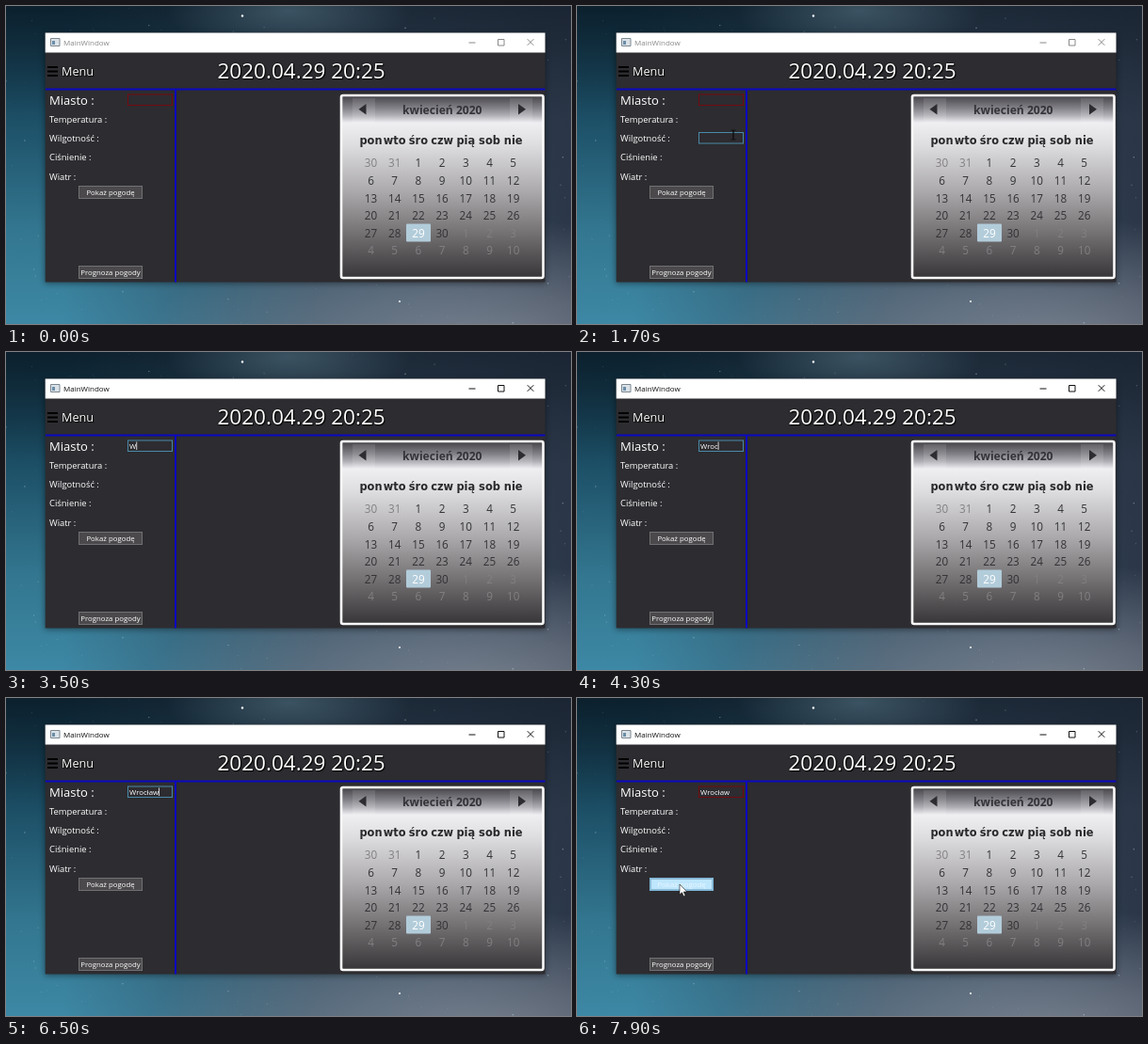
An HTML page for the animation above (8000 ms loop, 600 by 338 pixels).

```html
<!DOCTYPE html>
<html lang="pl">
<head>
<meta charset="utf-8">
<title>MainWindow</title>
<style>
  html, body { margin: 0; width: 100%; height: 100%; overflow: hidden; background: #173545; }
  svg { display: block; width: 600px; height: 338px; font-family: "Open Sans", "Noto Sans", sans-serif; }
  .label { font-size: 9.4px; font-weight: 500; fill: #fff; }
  .glow { fill: #fff; font-weight: 500; text-shadow: 1px 1px 1px #000, 0 0 2px #000; }
  .small { font-size: 7.8px; font-weight: 500; fill: #fff; }
  .mid { text-anchor: middle; }
  .head { font: bold 11.4px "DejaVu Sans", sans-serif; fill: #29292c; }
  .day { font-size: 11.7px; fill: #333235; }
  .other { fill: #828082; }
  .button rect { fill: #4b494b; stroke: #717073; }
  .button .focus { display: none; fill: none; stroke: #3b6a88; stroke-width: .7; stroke-dasharray: 1 1; }
  .button.hover rect { fill: #bee6fd; stroke: #7fb9dc; }
  .button.hover text { fill: #e9f6ff; }
  .button.hover .focus { display: block; }
  .box { fill: none; stroke: none; }
  .box.invalid { stroke: #730a10; }
  .box.lit { stroke: #4a8aa8; }
</style>
</head>
<body>
<svg viewBox="0 0 600 338">
  <defs>
    <linearGradient id="sky" x2="0" y2="1">
      <stop offset="0" stop-color="#0f2b3a"/>
      <stop offset=".35" stop-color="#1c4f66"/>
      <stop offset=".7" stop-color="#33768f"/>
      <stop offset="1" stop-color="#3d88a5"/>
    </linearGradient>
    <linearGradient id="dusk">
      <stop offset=".1" stop-color="#364354" stop-opacity="0"/>
      <stop offset=".55" stop-color="#364354" stop-opacity=".75"/>
      <stop offset="1" stop-color="#2b3445" stop-opacity=".95"/>
    </linearGradient>
    <radialGradient id="haze" gradientUnits="userSpaceOnUse" cx="0" cy="0" r="1"
      gradientTransform="translate(500 355) scale(350 130)">
      <stop offset="0" stop-color="#8c93a0" stop-opacity=".75"/>
      <stop offset=".4" stop-color="#8c93a0" stop-opacity=".5"/>
      <stop offset="1" stop-color="#8c93a0" stop-opacity="0"/>
    </radialGradient>
    <radialGradient id="cloud" gradientUnits="userSpaceOnUse" cx="0" cy="0" r="1"
      gradientTransform="translate(300 5) scale(130 45)">
      <stop offset="0" stop-color="#557484" stop-opacity=".55"/>
      <stop offset="1" stop-color="#557484" stop-opacity="0"/>
    </radialGradient>
    <linearGradient id="top" x2="0" y2="1">
      <stop offset="0" stop-color="#08131e" stop-opacity=".45"/>
      <stop offset=".35" stop-color="#08131e" stop-opacity="0"/>
    </linearGradient>
    <linearGradient id="panel" x2="0" y2="1">
      <stop offset="0" stop-color="#434146"/>
      <stop offset=".07" stop-color="#838288"/>
      <stop offset=".11" stop-color="#b0afb5"/>
      <stop offset=".15" stop-color="#efeff2"/>
      <stop offset=".27" stop-color="#dedde0"/>
      <stop offset=".53" stop-color="#aaa8aa"/>
      <stop offset=".74" stop-color="#787577"/>
      <stop offset="1" stop-color="#373537"/>
    </linearGradient>
    <filter id="soft" x="-10%" y="-10%" width="120%" height="120%"><feGaussianBlur stdDeviation="3"/></filter>
  </defs>

  <rect width="600" height="338" fill="url(#sky)"/>
  <rect width="600" height="338" fill="url(#dusk)"/>
  <rect width="600" height="338" fill="url(#top)"/>
  <rect width="600" height="338" fill="url(#haze)"/>
  <rect width="600" height="338" fill="url(#cloud)"/>
  <g id="stars" fill="#c8dce6"></g>
  <circle cx="251" cy="10.5" r="1.2" fill="#fff"/>
  <circle cx="418" cy="314" r="1" fill="#fff"/>

  <rect x="41" y="30" width="532" height="265" opacity=".4" filter="url(#soft)"/>
  <rect x="41.7" y="28.5" width="530.8" height="265" fill="#2d2c30"/>
  <rect x="41.7" y="28.5" width="530.8" height="21" fill="#fff"/>
  <path d="M47.5 34.5h9.5v8h-9.5z" fill="#dbe2e7" stroke="#7c8790"/>
  <path d="M49 37h3v4h-3z" fill="#6b8ea8"/>
  <text id="title" x="61" y="42" font-size="8">MainWindow</text>
  <path id="caption" d="M491.5 39h7M522.5 35.5h6.5v6.5h-6.5zM553.7 35.2l6.6 6.6m0-6.600l-6.600 6.600" fill="none"/>

  <path d="M44 65h11M44 69.500h11M44 74h11" stroke="#000" stroke-width="2.200"/>
  <text class="glow" x="59" y="74" font-size="12.700">Menu</text>
  <text class="glow" x="224.500" y="77" font-size="22.500">2020.04.29 20:25</text>
  <path d="M42 88.500h530.500M180 89v204.500" stroke="#0b08c0" stroke-width="2"/>

  <text class="label" x="46" y="105" style="font-size:13px">Miasto :</text>
  <text class="label" x="46" y="123.700">Temperatura :</text>
  <text class="label" x="46" y="144">Wilgotność :</text>
  <text class="label" x="46" y="164.200">Ciśnienie :</text>
  <text class="label" x="46" y="184.500">Wiatr :</text>

  <rect id="city" class="box" x="129.500" y="94" width="47" height="11.500"/>
  <rect id="humidity" class="box" x="129.500" y="134.500" width="47" height="11.500"/>
  <text id="typed" class="small" x="131" y="102.700"></text>
  <path id="caret" d="M0 95.500v8.500" stroke="#fff" stroke-width=".8"/>

  <g id="show" class="button">
    <rect x="77.500" y="191.500" width="67" height="13"/>
    <text class="small mid" x="111" y="201">Pokaż pogodę</text>
    <path class="focus" d="M78.500 192.500h65v11h-65z"/>
  </g>
  <g class="button">
    <rect x="77.500" y="276.500" width="67" height="13"/>
    <text class="small mid" x="111" y="285.800">Prognoza pogody</text>
  </g>

  <rect x="356" y="95" width="214.500" height="194" rx="2" fill="url(#panel)" stroke="#fafafa" stroke-width="2.600"/>
  <path d="M368 98h24v26h-24zM535 98h24v26h-24z" fill="#fff" opacity=".1"/>
  <path d="M382.500 104v11.500l-8-5.750zM544 104v11.500l8-5.750z" fill="#2d2c30"/>
  <text class="mid" x="463.300" y="114.800" font-size="12.100" font-weight="700" fill="#343338">kwiecień 2020</text>
  <rect x="425" y="231.500" width="26" height="19" rx="1" fill="#b2ccda"/>
  <g id="days"></g>

  <path id="beam" d="M-2.500-5h2q.5 0 .5.500v9q0 .5-.5.500h-2M2.500-5h-2q-.5 0-.5.500v9q0 .5.500.500h2" fill="none" stroke="#0c0c0e" stroke-width=".8"/>
  <path id="arrow" d="M0 0v11l2.500-2.300 1.800 4 1.800-.8-1.800-3.900h3.500z" fill="#fff" stroke="#111" stroke-width=".6"/>
</svg>
<script>
  const NS = "http://www.w3.org/2000/svg";
  const $ = id => document.getElementById(id);

  function add(parent, tag, attrs, text = "") {
    const el = document.createElementNS(NS, tag);
    for (const key in attrs) el.setAttribute(key, attrs[key]);
    el.textContent = text;
    parent.append(el);
  }

  let seed = 17;
  const random = () => (seed = seed * 16807 % 2147483647) / 2147483647;
  for (let i = 0; i < 230; i++) {
    add($("stars"), "circle", {
      cx: random() * 600, cy: random() * 338,
      r: .25 + random() ** 3 * .6, opacity: .15 + random() * .4
    });
  }

  const column = i => 387.5 + i * 25.2;
  "pon wto śro czw pią sob nie".split(" ").forEach((name, i) =>
    add($("days"), "text", { class: "head mid", x: column(i), y: 146.5 }, name));
  for (let i = 0; i < 42; i++) {
    const date = new Date(2020, 2, 30 + i);
    const day = date.getDate();
    const april = date.getMonth() === 3;
    add($("days"), "text", {
      class: "day mid" + (april ? "" : " other"),
      x: column(i % 7), y: 171.2 + Math.floor(i / 7) * 18.65,
      style: april && day === 29 ? "fill:#fff" : ""
    }, day);
  }

  const LOOP = 8000, FOCUS = 2500, CLICK = 7600;
  const WORD = "Wrocław";
  const KEYS = [3500, 3800, 4000, 4200, 4700, 4900, 5100];
  // time, x, y
  const PATH = [
    [900, 215, 345], [1600, 166, 137], [1900, 166, 137], [2400, 148, 104],
    [6700, 148, 104], [7200, 104, 189], [7500, 109, 198]
  ];

  function pointer(t) {
    const n = PATH.findIndex(p => p[0] > t);
    if (n < 0) return PATH.at(-1).slice(1);
    if (n === 0) return PATH[0].slice(1);
    const [a, b] = [PATH[n - 1], PATH[n]];
    const k = (t - a[0]) / (b[0] - a[0]);
    return [a[1] + (b[1] - a[1]) * k, a[2] + (b[2] - a[2]) * k];
  }

  const visible = (el, on) => el.setAttribute("visibility", on ? "visible" : "hidden");
  const inside = (x, y, left, top, w, h) => x >= left && x <= left + w && y >= top && y <= top + h;

  function draw(t) {
    const [x, y] = pointer(t);
    const shown = t >= 900 && (t < KEYS[0] || t >= 6700);
    const onCity = shown && inside(x, y, 129, 94, 48, 12);
    const onHumidity = shown && inside(x, y, 129, 134, 48, 12);
    const focused = t >= FOCUS && t < CLICK;
    const active = t >= FOCUS;

    $("title").setAttribute("fill", active ? "#111" : "#888");
    $("caption").setAttribute("stroke", active ? "#111" : "#888");
    $("city").setAttribute("class", "box " + (focused || onCity ? "lit" : "invalid"));
    $("humidity").setAttribute("class", "box" + (onHumidity ? " lit" : ""));
    $("show").setAttribute("class", "button" + (shown && inside(x, y, 77, 191, 68, 14) ? " hover" : ""));

    const count = KEYS.filter(key => key <= t).length;
    $("typed").textContent = WORD.slice(0, count);
    const since = t - (count ? KEYS[count - 1] : FOCUS);
    const end = count ? $("typed").getComputedTextLength() : 0;
    $("caret").setAttribute("transform", `translate(${131.5 + end} 0)`);
    visible($("caret"), focused && since % 1060 < 530);

    const beam = onCity || onHumidity;
    for (const id of ["beam", "arrow"]) {
      $(id).setAttribute("transform", `translate(${x} ${y})`);
      visible($(id), shown && beam === (id === "beam"));
    }
  }

  const start = performance.now();
  function tick() {
    const t = (performance.now() - start) % LOOP;
    draw(Math.floor(t / 100) * 100);
    requestAnimationFrame(tick);
  }
  tick();
</script>
</body>
</html>
```
